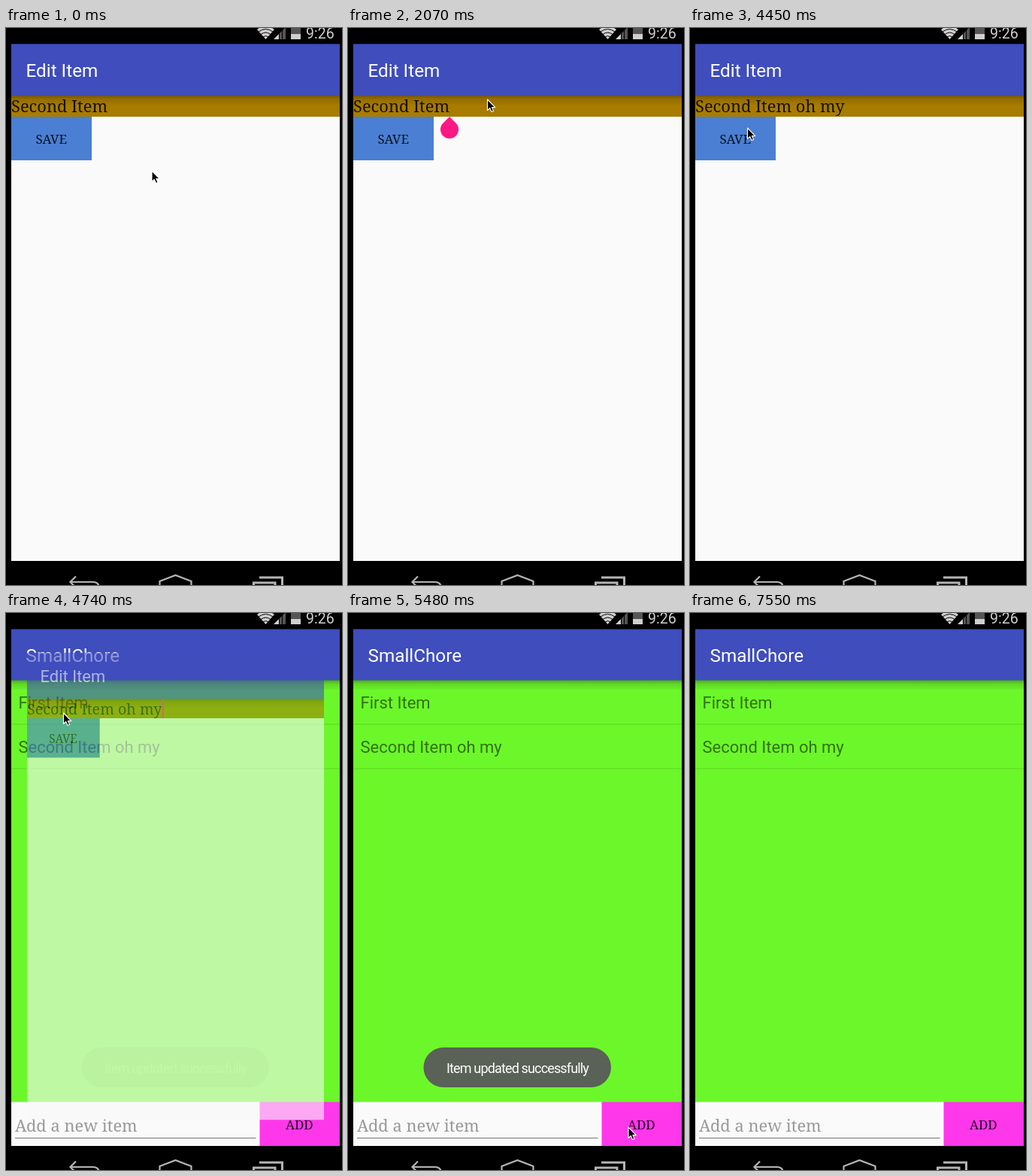
Recreate the animation shown at these times as an HTML page. Size 447 px wide and 741 px high, loop 8.75 s.

```html
<!DOCTYPE html>
<html lang="en">
<head>
<meta charset="utf-8">
<title>To-do app</title>
<style>
  html, body { margin: 0; width: 100%; height: 100%; overflow: hidden; background: #000; }
  svg { display: block; width: 100vw; height: 100vh; }
  text { white-space: pre; }
  .sans { font-family: Roboto, sans-serif; }
  .serif { font-family: "Noto Serif", serif; }
  .title { font-size: 24.28px; fill: #fff; }
  .body { font-size: 21.85px; }
  .row { font-size: 22px; fill-opacity: .54; }
  .button { font-size: 17px; fill: rgba(0, 0, 0, .87); }
</style>
</head>
<body>
<svg viewBox="0 0 447 741" xmlns="http://www.w3.org/2000/svg">
  <defs>
    <linearGradient id="shade" x1="0" y1="0" x2="0" y2="1">
      <stop offset="0" stop-opacity=".34"/>
      <stop offset=".4" stop-opacity=".13"/>
      <stop offset="1" stop-opacity=".03"/>
    </linearGradient>
    <g id="bar">
      <rect x="7" y="89" width="437" height="13" fill="url(#shade)"/>
      <rect x="7" y="21.500" width="437" height="68" fill="#3f4dbd"/>
    </g>
  </defs>
  <rect width="447" height="741"/>

  <!-- status bar -->
  <g fill="#cfcfcf">
    <path d="M334 2Q345.500 -7 357 2L345.500 15Z"/>
    <g fill="none" stroke="#000">
      <path d="M336 5Q345.500 -2 355 5"/>
      <path d="M339 8.500Q345.500 3.500 352 8.500"/>
      <path d="M342 11.800Q345.500 9.300 349 11.800"/>
    </g>
    <path d="M356 15L363 8V15Z"/>
    <path d="M364 15V7L367 4V15ZM368 15V3L372 -1V15Z" fill="#555"/>
    <path d="M379 0H392V8H379Z" fill="#555"/>
    <path d="M379 8H392V15H379Z"/>
    <text class="sans" x="399" y="14" font-size="19.500">9:26</text>
  </g>

  <!-- navigation bar -->
  <g fill="none" stroke="#b5b5b5" stroke-width="2.200">
    <path d="M93 729.500L85.500 737L93 744.500M86 737H115Q123 737 123.500 743"/>
    <path d="M204.500 743V736L225.500 728L246.500 736V743"/>
    <path d="M329.500 743V738H358V743M337 731H367.500V743" stroke-width="3"/>
  </g>

  <!-- list screen -->
  <g>
    <rect x="7" y="89" width="437" height="562" fill="#6cf72a"/>
    <path d="M7 148H444M7 207H444" stroke="#000" stroke-opacity=".14"/>
    <use href="#bar"/>
    <text class="sans title" x="26.500" y="64.500">SmallChore</text>
    <text class="sans row" x="16.500" y="127">First Item</text>
    <text class="sans row" x="16.500" y="186">Second Item oh my</text>
    <rect x="7" y="650.500" width="331" height="58.500" fill="#fafafa"/>
    <rect x="337.500" y="650.500" width="106.500" height="58.500" fill="#ff37ea"/>
    <text class="serif body" x="12" y="690" fill="#999">Add a new item</text>
    <path d="M12 698.500H332.500" stroke="#777"/>
    <text class="serif button" x="372" y="686.500">ADD</text>
  </g>

  <!-- edit screen -->
  <g id="edit">
    <rect x="7" y="90" width="437" height="619" fill="#fafafa"/>
    <rect x="7" y="89" width="437" height="29" fill="#a87c00"/>
    <use href="#bar"/>
    <text class="sans title" x="26.500" y="64.500">Edit Item</text>
    <text id="field" class="serif body" x="7" y="112" fill-opacity=".87"></text>
    <rect id="caret" y="90" width="2.400" height="28" fill="#ff1783"/>
    <rect x="7" y="118" width="107" height="58" fill="#4a7fd3"/>
    <text class="serif button" x="39.500" y="154">SAVE</text>
    <path id="handle" d="M135 118L143.500 126.500A12 12 0 1 1 126.500 126.500Z" fill="#ff1783"/>
  </g>

  <g id="toast">
    <rect x="100.500" y="578" width="249.500" height="53" rx="26.500" fill="#5a6156"/>
    <text class="sans" x="131" y="612" font-size="18" letter-spacing="-.850" fill="#fff">Item updated successfully</text>
  </g>

  <path id="pointer" d="M0 0V14.500L3.300 11.500L5.500 16.500L8 15.400L5.900 10.600H10.300Z"
    stroke="#fff" stroke-width="1.100" stroke-linejoin="round"/>
</svg>
<script>
const LOOP = 8750, STEP = 148; // the screen updates once per step
const $ = id => document.getElementById(id);
const edit = $('edit'), field = $('field'), caret = $('caret');
const handle = $('handle'), toast = $('toast'), pointer = $('pointer');

// Events, in steps
const FOCUS = 2, CLICK = 10, CLOSE = 31, TOAST_END = 49, LEAVE = 51;
const keys = [18, 18, 21, 23, 25, 26];
const beats = [FOCUS, CLICK, ...keys];

const home = { x: 194, y: 190 };
const moves = [
  { from: 0, to: FOCUS, x: 225, y: 98 },
  { from: 7, to: 11, x: 185.5, y: 95 },
  { from: 24, to: 30, x: 76.5, y: 133 },
  { from: 32, to: 37, x: 373, y: 684 },
  { from: 38, to: 44, x: 442, y: 390 },
  { from: 45, to: TOAST_END, x: 428.5, y: 718.5 }
];

const clamp = v => Math.min(1, Math.max(0, v));
const smooth = p => p * p * (3 - 2 * p);
const show = (el, on) => el.setAttribute('visibility', on ? 'inherit' : 'hidden');

function pointerAt(k) {
  return moves.reduce((at, m) => {
    const p = clamp((k - m.from) / (m.to - m.from));
    return {
      x: at.x + (m.x - at.x) * p ** 1.2,
      y: at.y + (m.y - at.y) * smooth(p)
    };
  }, home);
}

// Solid for four steps after each touch or key, then blinking
function caretLit(k) {
  const beat = beats.filter(b => b <= k).pop();
  return (k - beat) % 6 < 4;
}

function draw(time) {
  const k = Math.floor((time + 8) / STEP);

  const typed = keys.filter(b => b <= k).length;
  field.textContent = 'Second Item' + ' oh my'.slice(0, typed);
  const end = k < CLICK ? 0 : field.getComputedTextLength();
  caret.setAttribute('x', 7.3 + end);
  show(caret, caretLit(k));
  show(handle, k >= CLICK && k < keys[0] - 1);

  const closing = Math.min(3, Math.max(0, k - CLOSE));
  edit.setAttribute('transform',
    `translate(225.5 347) scale(${1 - .096 * closing}) translate(-225.5 -347)`);
  edit.setAttribute('opacity', clamp(1.1 - .52 * closing));

  const rise = .03 + (k - CLOSE - 1) / 2, fall = (TOAST_END - k) / 4;
  toast.setAttribute('opacity', clamp(Math.min(rise, fall)));

  const { x, y } = pointerAt(k);
  pointer.setAttribute('transform', `translate(${x} ${y})`);
  show(pointer, k < LEAVE);
}

const start = performance.now();
function frame() {
  draw((performance.now() - start) % LOOP);
  requestAnimationFrame(frame);
}
frame();
</script>
</body>
</html>
```
